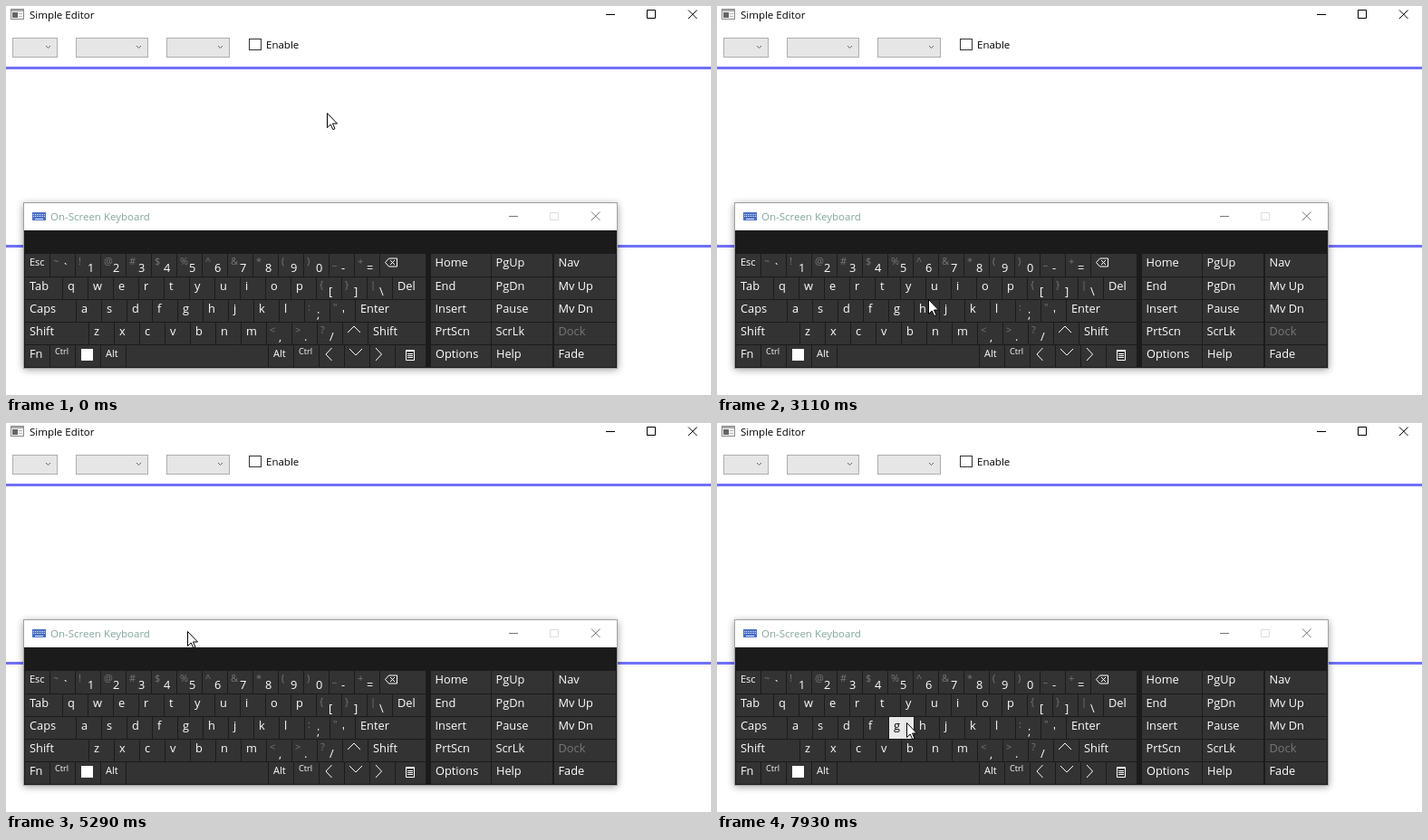
An HTML page for the animation above (8 s loop, 778 by 430 pixels).

```html
<!DOCTYPE html>
<html lang="en">
<head>
<meta charset="utf-8">
<title>Simple Editor</title>
<style>
html, body { margin: 0; width: 100%; height: 100%; overflow: hidden; background: #fff; }
svg { display: block; width: 778px; height: 430px; font-family: "Open Sans", "Noto Sans", sans-serif; }
text { white-space: pre; }
.ui { font-size: 11.5px; }
.key rect { fill: #333; }
.key text { fill: #fff; font-size: 12.8px; }
.key path { fill: none; stroke: #fff; }
.key .alt { fill: #777; font-size: 11px; }
.key .tiny { font-size: 9.2px; }
.key .esc { font-size: 11px; }
.key.off text { fill: #777; }
.key.hover rect { fill: #e9e9e9; }
.key.hover text { fill: #000; }
.key.hover .alt { fill: #999; }
.key.down rect { fill: #0078d7; }
.key.down text { fill: #fff; }
.line { fill: none; stroke: #000; }
.box { fill: #e6e6e6; stroke: #adadad; }
</style>
</head>
<body>
<svg id="stage" viewBox="0 0 778 430">
  <defs>
    <filter id="blur" x="-10%" y="-20%" width="120%" height="140%"><feGaussianBlur stdDeviation="4"/></filter>
  </defs>
  <rect width="778" height="430" fill="#fff"/>
  <rect x="5.5" y="3.5" width="14" height="11" fill="#f4f4f4" stroke="#8a8a8a"/>
  <path d="M6 5h13" stroke="#aaa" stroke-width="2"/>
  <rect x="7" y="7" width="6" height="6" fill="#666"/>
  <path d="M14 8.5h4M14 11.5h4" stroke="#bbb"/>
  <text class="ui" x="26" y="14">Simple Editor</text>
  <path class="line" d="M662 9.5h10M707.5 4.5h9v9h-9zM753 4.5l9.5 9.5M762.5 4.5l-9.5 9.5"/>
  <g id="combos"></g>
  <rect x="268.5" y="36.5" width="13" height="12" fill="#fff" stroke="#333"/>
  <text class="ui" x="287" y="47">Enable</text>
  <path d="M0 68.5h778M0 265.5h778" stroke="#7070f8" stroke-width="3"/>

  <rect x="19" y="219" width="656" height="183" fill="#000" opacity=".38" filter="url(#blur)"/>
  <rect x="19.5" y="217.5" width="655" height="183" fill="#1b1b1b" stroke="#a0a0a0"/>
  <rect x="20" y="218" width="654" height="30" fill="#fff"/>
  <rect x="29" y="228" width="15" height="9" fill="#4a6fc0"/>
  <path d="M30 230.5h13M30 232.5h13" stroke="#dce6ff" stroke-dasharray="1 1"/>
  <path d="M32 235.5h9" stroke="#dce6ff"/>
  <text class="ui" x="49" y="237" fill="#82a69e">On-Screen Keyboard</text>
  <path class="line" style="stroke:#777" d="M555 232.5h10M646 227.5l9.5 9.5M655.5 227.5l-9.5 9.5"/>
  <path class="line" style="stroke:#ddd" d="M600.5 228.5h9v8h-9z"/>
  <g id="words"></g>
  <g id="keys"></g>
  <path id="cursor" d="M.5 .5V16.5L4.2 13L6.8 18.6L9 17.6L6.5 12H11.5Z" fill="#fff" stroke="#000"/>
</svg>
<script>
const byId = id => document.getElementById(id);

function add(parent, tag, attrs, text) {
  const node = document.createElementNS("http://www.w3.org/2000/svg", tag);
  for (const name in attrs) node.setAttribute(name, attrs[name]);
  if (text) node.textContent = text;
  return parent.appendChild(node);
}

for (const [x, width] of [[7, 50], [77, 80], [177, 70]]) {
  add(byId("combos"), "rect", { class: "box", x: x + .5, y: 35.5, width: width - 1, height: 21 });
  add(byId("combos"), "path", { class: "line", style: "stroke:#666", d: `M${x + width - 13} 44l2.5 2.5l2.5 -2.5` });
}

const rowTops = [274, 300, 325, 350, 375];
const keys = [];

function addKey(x, right, row, label, dx = 5) {
  const y = rowTops[row], height = row ? 24 : 25;
  const node = add(byId("keys"), "g", { class: label === "Dock" ? "key off" : "key" });
  add(node, "rect", { x, y, width: right - x, height });
  keys.push({ x, right, y, bottom: y + height, node });
  if (icons[label]) {
    add(node, "path", { d: icons[label], transform: `translate(${x} ${y})` });
  } else if (label === "Win") {
    add(node, "rect", { x: x + 6, y: y + 4, width: 13, height: 13, style: "fill:#fff" });
  } else if (label.length === 2 && label !== "Fn") {
    add(node, "text", { class: "alt", x: x + 3, y: y + 12 }, label[0]);
    add(node, "text", { x: x + 13, y: y + 20 }, label[1]);
  } else {
    const style = { Ctrl: "tiny", Esc: "esc", Alt: "esc" }[label] || "";
    add(node, "text", { class: style, x: x + dx, y: y + (style === "tiny" ? 10 : style ? 12.5 : 14) }, label);
  }
}

const icons = {
  Back: "M5.5 9.5l4 -4.5h9v9h-9zM11 7l5 5M16 7l-5 5",
  Up: "M5 11l7 -7l7 7",
  Left: "M13.5 3l-6.5 7l6.5 7",
  Down: "M5 4l7 7l7 -7",
  Right: "M6 3l6.5 7l-6.5 7",
  Menu: "M11.5 5.5h9v11h-9zM11 6.5h10M13 9.5h6M13 11.5h6M13 13.5h6"
};

// Each row: first label, left edge of the 28 px keys, their labels, last label.
[
  ["Esc", 49, "~` !1 @2 #3 $4 %5 ^6 &7 *8 (9 )0 _- +=", "Back"],
  ["Tab", 63, "q w e r t y u i o p {[ }] |\\", "Del"],
  ["Caps", 78, "a s d f g h j k l :; \"'", "Enter"],
  ["Shift", 92, "z x c v b n m <, >. ?/ Up", "Shift"]
].forEach(([first, left, labels, last], row) => {
  addKey(21, left - 1, row, first);
  let x = left;
  for (const label of labels.split(" ")) {
    addKey(x, x + 27, row, label);
    x += 28;
  }
  addKey(x, 463, row, last);
});

["Fn", "Ctrl", "Win", "Alt"].forEach((label, i) => addKey(21 + 28 * i, 48 + 28 * i, 4, label));
addKey(133, 289, 4, " ");
["Alt", "Ctrl", "Left", "Down", "Right"].forEach((label, i) => addKey(290 + 28 * i, 317 + 28 * i, 4, label));
addKey(430, 463, 4, "Menu");

[
  [469, 535, "Home End Insert PrtScn Options"],
  [536, 603, "PgUp PgDn Pause ScrLk Help"],
  [605, 673, "Nav Mv_Up Mv_Dn Dock Fade"]
].forEach(([x, right, labels]) => labels.split(" ").forEach((label, row) =>
  addKey(x, right, row, label.replace("_", " "), row === 4 && x < 600 ? 5 : 4.5)));

"the to that this tavello they time their".split(" ").forEach((word, i) => {
  const x = 21 + 81 * i;
  const node = add(byId("words"), "g", { class: "key" });
  add(node, "rect", { x, y: 249, width: i === 7 ? 85 : 80, height: 23 });
  add(node, "text", { x: x + 5, y: 262 }, word);
});

// Pointer moves: first step, last step, number of steps, points passed.
const LOOP = 8000;
const home = [354, 118];
const moves = [
  [1250, 1560, 5, [342, 106], [319, 111], [331, 118]],
  [1710, 1880, 3, [316, 213]],
  [2090, 2325, 4, [320, 195], [311, 291]],
  [2410, 2710, 5, [286, 320]],
  [2880, 3110, 4, [265, 324], [233, 324]],
  [3270, 3420, 3, [224, 330], [195, 321]],
  [3890, 3890, 1, [198, 319]],
  [4040, 4190, 3, [216, 339]],
  [4350, 4500, 3, [224, 339]],
  [4900, 5030, 3, [205, 340]],
  [5200, 5600, 6, [200, 230], [186, 170], [182, 150]],
  [5820, 5820, 1, [194, 155]],
  [6050, 6215, 3, [184, 215], [203, 306]],
  [6300, 6850, 8, [214, 323], [236, 314]],
  [7080, 7240, 3, [226, 330]],
  [7390, 7930, 8, [209, 331]]
];
const presses = [[3495, 3570], [4500, 4650], [6930, 7080]];
const suggestions = [3730, 4500];
const within = (t, [from, to]) => t >= from && t < to;

function pointerAt(t) {
  let pos = home;
  for (const [from, to, steps, ...points] of moves) {
    if (t < from) break;
    const gap = (to - from) / Math.max(1, steps - 1);
    const step = t >= to ? steps : Math.floor((t - from) / gap) + 1;
    const path = [pos, ...points];
    const u = step / steps * points.length;
    const leg = Math.min(Math.floor(u), points.length - 1);
    pos = path[leg].map((a, i) => Math.round(a + (path[leg + 1][i] - a) * (u - leg)));
  }
  return pos;
}

let active;
function draw(now) {
  const t = now % LOOP;
  const [x, y] = pointerAt(t);
  byId("cursor").setAttribute("transform", `translate(${x} ${y})`);
  byId("words").setAttribute("visibility", within(t, suggestions) ? "visible" : "hidden");
  const hit = keys.find(k => x >= k.x && x < k.right && y >= k.y && y < k.bottom);
  if (active && active !== hit) active.node.setAttribute("class", "key");
  if (hit) hit.node.setAttribute("class", presses.some(p => within(t, p)) ? "key down" : "key hover");
  active = hit;
}

const start = performance.now();
function tick() {
  draw(performance.now() - start);
  requestAnimationFrame(tick);
}
tick();
</script>
</body>
</html>
```
